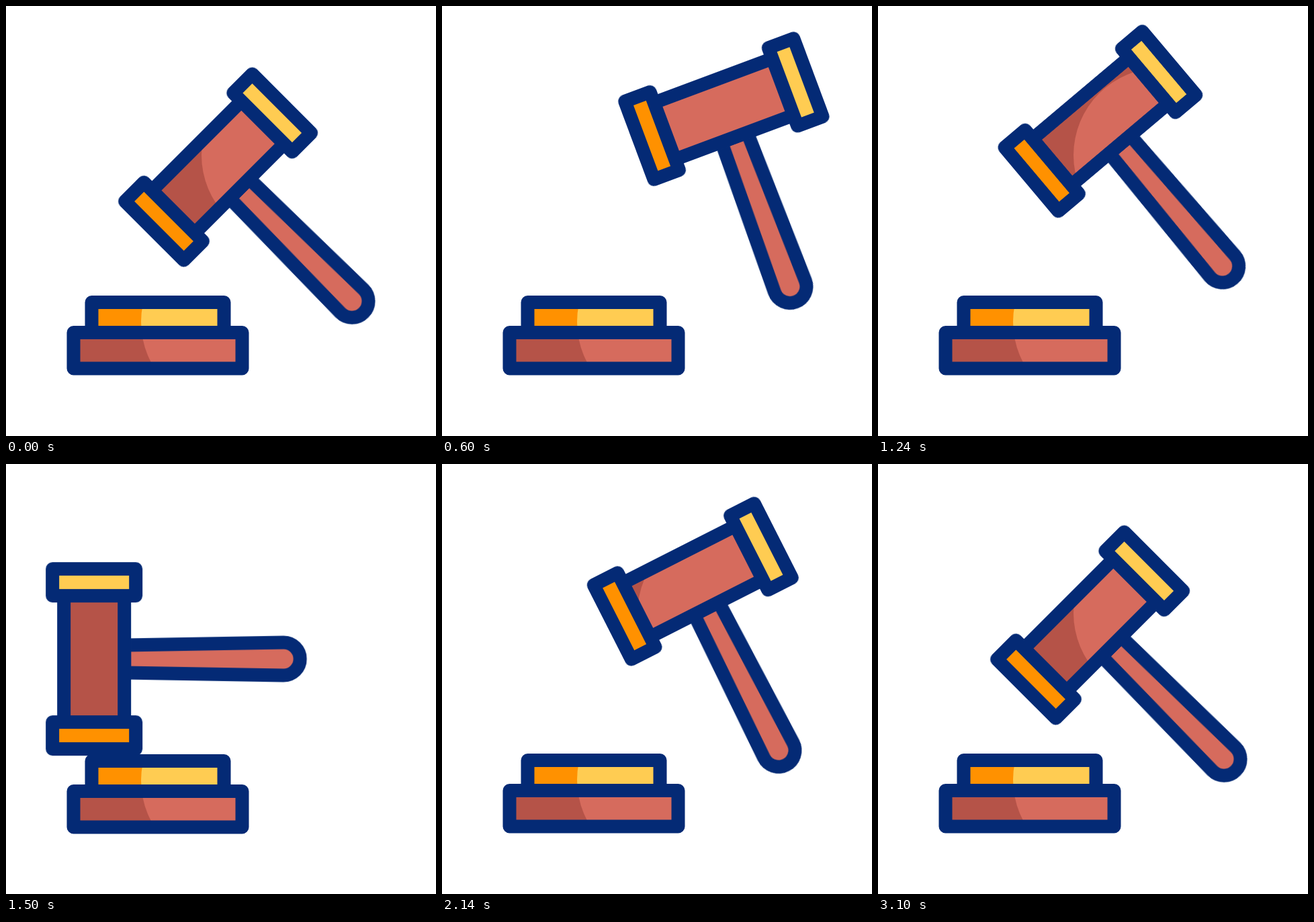
Recreate the animation shown at these times as an HTML page without scripts. Size 640 by 640 pixels, loop 3600 ms.

```html
<!DOCTYPE html>
<html lang="en">
<head>
<meta charset="utf-8">
<title>Gavel</title>
<style>
  html, body { margin: 0; width: 100%; height: 100%; overflow: hidden; background: #fff; }
  svg { display: block; width: 100%; height: 100%; }

  .line { fill: none; stroke: #042a75; stroke-width: 20; stroke-linejoin: round; }
  .wood { fill: #d66b5d; }
  .shade { fill: #b55348; }
  .gold { fill: #ffcc52; }
  .amber { fill: #ff9100; }

  .swing { transform-origin: 358px 282px; animation: swing 3.6s infinite; }
  .base { animation: dip 3.6s infinite; }

  @keyframes swing {
    0% { transform: translate(0, 0) rotate(0deg); animation-timing-function: cubic-bezier(.333, 0, .667, 1); }
    21.389% { transform: translate(94px, -83px) rotate(28deg); animation-timing-function: cubic-bezier(.5, 0, .85, .45); }
    30% { transform: translate(71px, -78px) rotate(21.5deg); animation-timing-function: cubic-bezier(.33, .26, .67, .57); }
    34.444% { transform: translate(12px, -65px) rotate(5deg); animation-timing-function: cubic-bezier(.33, .2, .7, .6); }
    41.111% { transform: translate(-167px, 8px) rotate(-45deg); animation-timing-function: linear; }
    45% { transform: translate(-167px, 8px) rotate(-45deg); animation-timing-function: cubic-bezier(.2, .5, .6, .82); }
    50.556% { transform: translate(7.6px, -45.4px) rotate(.9deg); animation-timing-function: cubic-bezier(.33, .37, .67, .74); }
    52.778% { transform: translate(34px, -50px) rotate(8deg); animation-timing-function: cubic-bezier(.3, .45, .6, 1); }
    59.722% { transform: translate(42.5px, -54px) rotate(18.1deg); animation-timing-function: cubic-bezier(.4, 0, .7, .6); }
    77.222% { transform: translate(6.5px, -15.5px) rotate(7.3deg); animation-timing-function: cubic-bezier(.25, .4, .6, 1); }
    86.111%, 100% { transform: translate(0, 0) rotate(0deg); }
  }

  @keyframes dip {
    0%, 40.5%, 44.4%, 100% { transform: translateY(0); }
    42% { transform: translateY(1px); }
  }
</style>
</head>
<body>
<svg viewBox="0 0 640 640">
  <defs>
    <rect id="body" x="-94" y="-45" width="188" height="90"/>
    <rect id="cap" x="-20" y="-62" width="40" height="124"/>
    <path id="handle" d="M-20.5 45L-24.5 282A24.5 24.5 0 0 0 24.5 282L20.5 45Z"/>
    <rect id="step" x="127.5" y="441" width="197" height="45"/>
    <rect id="foot" x="100.5" y="486" width="251" height="53.5"/>
    <clipPath id="inBody">
      <rect class="swing" x="221.6" y="194.8" width="188" height="90" style="transform-origin:358px 282px;animation-name:swing" visibility="hidden"/>
    </clipPath>
    <!-- moves with the head, so the shade stays inside it -->
    <clipPath id="head">
      <path class="swing" d="M217.3 274.5L350.2 141.5L413.9 205.1L280.9 338.1Z"/>
    </clipPath>
    <clipPath id="light"><circle cx="331" cy="470" r="130"/></clipPath>
  </defs>

  <g class="base">
    <use href="#step" class="amber"/>
    <use href="#step" class="gold" clip-path="url(#light)"/>
    <use href="#step" class="line"/>
    <use href="#foot" class="shade"/>
    <use href="#foot" class="wood" clip-path="url(#light)"/>
    <use href="#foot" class="line"/>
  </g>

  <g class="swing">
    <g transform="translate(315.6 239.8) rotate(-45)">
      <use href="#handle" class="wood"/>
      <use href="#handle" class="line"/>
      <use href="#body" class="wood"/>
    </g>
  </g>

  <!-- the shade keeps its place while the head passes through it -->
  <g clip-path="url(#head)">
    <path class="shade" d="M0 0H421V92A130 130 0 0 0 421 352V640H0Z"/>
  </g>

  <g class="swing">
    <g transform="translate(315.6 239.8) rotate(-45)">
      <use href="#body" class="line"/>
      <g transform="translate(-114 0)">
        <use href="#cap" class="amber"/>
        <use href="#cap" class="line"/>
      </g>
      <g transform="translate(114 0)">
        <use href="#cap" class="gold"/>
        <use href="#cap" class="line"/>
      </g>
    </g>
  </g>
</svg>
</body>
</html>
```
